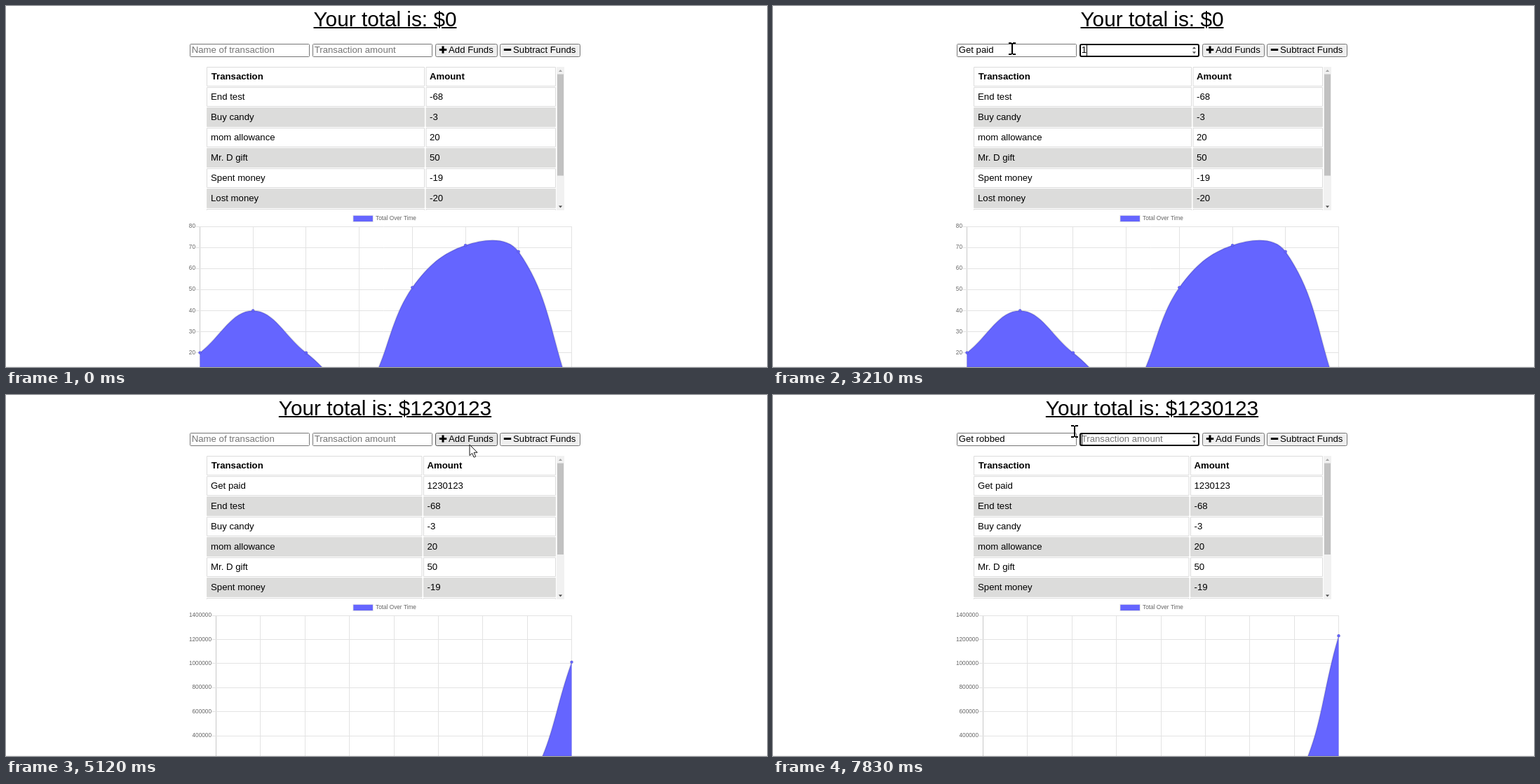
Animation of 1085 by 516 pixels, one loop 8 s. Source, as an HTML page with a canvas:

```html
<!DOCTYPE html>
<html lang="en">
<head>
<meta charset="utf-8">
<title>Budget tracker</title>
<style>
  html, body { margin: 0; width: 100%; height: 100%; overflow: hidden; background: #fff; }
  canvas { position: absolute; left: 0; top: 0; }
  #total {
    position: absolute; left: 0; top: 2px; width: 1081px; text-align: center;
    font: 29.75px/34px "Liberation Sans", Arial, sans-serif; color: #000;
    text-decoration: underline 2px;
  }
</style>
</head>
<body>
<div id="total"></div>
<canvas id="stage" width="1085" height="516"></canvas>
<script>
const LOOP = 8000, SUBMIT = 4840, CHART_START = 4770;
const ctx = document.getElementById('stage').getContext('2d');
const title = document.getElementById('total');
const FONT = '"Liberation Sans", Arial, sans-serif';
const BLUE = '#6565ff', SHADE = 'rgba(0,0,0,.1)', BORDER = '#767676';

const history = [
  ['Lost money', -20], ['Spent money', -19], ['Mr. D gift', 50],
  ['mom allowance', 20], ['Buy candy', -3], ['End test', -68], ['Get paid', 1230123]
];
const totals = [20, 40, 20, 1, 51, 71, 68, 0, 1230123];

// Key press times for each entry; the fields gain focus at the given times.
const firstName = { text: 'Get paid', keys: [1810, 1900, 1990, 2080, 2340, 2455, 2570, 2685] };
const firstAmount = { text: '1230123', keys: [3210, 3300, 3400, 3490, 3590, 3680, 4140] };
const secondName = { text: 'Get robbed', keys: [6760, 6870, 6980, 7090, 7200, 7320, 7430, 7500, 7610, 7720] };
const focusSpans = [
  [880, 2800, 'name'], [2800, 4740, 'amount'], [6100, 7830, 'name'], [7830, LOOP, 'amount']
];

// Pointer stops: time, x, y
const pointerPath = [
  [110, 1037, 496], [700, 341, 61], [4080, 341, 61], [4140, 350, 54], [4700, 671, 66],
  [4900, 671, 66], [5120, 661, 71], [5600, 677, 73], [5950, 677, 73], [6100, 415, 61], [6370, 430, 52]
];

const lerp = (a, b, u) => a + (b - a) * u;

function text(str, x, y, { size = 13.2, color = '#000', weight = '', align = 'left' } = {}) {
  ctx.font = `${weight} ${size}px ${FONT}`;
  ctx.fillStyle = color;
  ctx.textAlign = align;
  ctx.fillText(str, x, y);
}

function rect(x, y, w, h, color) {
  ctx.fillStyle = color;
  ctx.fillRect(x, y, w, h);
}

function line(x1, y1, x2, y2, color) {
  ctx.strokeStyle = color;
  ctx.lineWidth = 1;
  ctx.beginPath();
  ctx.moveTo(x1, y1);
  ctx.lineTo(x2, y2);
  ctx.stroke();
}

function frame(x, y, w, h, fill, stroke, width = 1, radius = 2) {
  ctx.beginPath();
  ctx.roundRect(x + width / 2, y + width / 2, w - width, h - width, radius);
  ctx.fillStyle = fill;
  ctx.fill();
  ctx.strokeStyle = stroke;
  ctx.lineWidth = width;
  ctx.stroke();
}

function polygon(points, color) {
  ctx.beginPath();
  points.forEach(([x, y]) => ctx.lineTo(x, y));
  ctx.closePath();
  ctx.fillStyle = color;
  ctx.fill();
}

// dir -1 points up, 1 points down
const triangle = (x, y, half, height, dir, color) =>
  polygon([[x - half, y - dir * height / 2], [x + half, y - dir * height / 2], [x, y + dir * height / 2]], color);

const typed = (entry, t) => entry.text.slice(0, entry.keys.filter(k => k <= t).length);

function pointerAt(t) {
  if (t < pointerPath[0][0]) return null;
  const next = pointerPath.findIndex(p => p[0] > t);
  if (next < 0) return pointerPath.at(-1).slice(1);
  const [t0, x0, y0] = pointerPath[next - 1], [t1, x1, y1] = pointerPath[next];
  const u = (t - t0) / (t1 - t0), e = u * u * (3 - 2 * u);
  return [lerp(x0, x1, e), lerp(y0, y1, e)];
}

function drawInput(x, value, placeholder, focus, t) {
  frame(x, 54, 171, 19, '#fff', focus ? '#000' : BORDER, focus ? 2 : 1, focus ? 2 : 1);
  text(value || placeholder, x + 2.7, 67, { color: value ? '#000' : '#757575' });
  if (!focus) return;
  const keys = [firstName, firstAmount, secondName].flatMap(e => e.keys);
  const lastInput = Math.max(focus[0], ...keys.filter(k => k <= t));
  if ((t - lastInput) % 1060 < 530) {
    const end = x + 2.7 + (value ? ctx.measureText(value).width : 0);
    rect(Math.round(end), 56, 1, 15, '#000');
  }
  if (focus[2] === 'amount') {
    triangle(600.5, 59.7, 2.6, 3, -1, '#505050');
    triangle(600.5, 66.7, 2.6, 3, 1, '#505050');
  }
}

function drawButton(x, w, label, plus, state) {
  const [fill, stroke] = { idle: ['#efefef', BORDER], hover: ['#e5e5e5', '#4f4f4f'], active: ['#f5f5f5', '#8d8d8d'] }[state];
  frame(x, 54, w, 19, fill, stroke);
  rect(x + 5.8, 61, 10.4, 3, '#000');
  if (plus) rect(x + 9.5, 57.4, 3, 10.2, '#000');
  text(label, x + 19, 67);
}

function drawTable(submitted) {
  const split = submitted ? 593.5 : 597;
  const entries = history.slice(0, submitted ? 7 : 6).reverse();
  const rows = [['Transaction', 'Amount'], ...entries, ['', '']];
  ctx.save();
  ctx.beginPath();
  ctx.rect(280, 80, 520, 212);
  ctx.clip();
  rows.slice(0, 8).forEach(([name, amount], i) => {
    const top = 87 + Math.round(28.95 * i), weight = i ? '' : 'bold';
    for (const [x, end] of [[286, split], [split + 1.5, 784]]) {
      const gray = i && i % 2 === 0;
      frame(x, top, end - x, 28, gray ? '#dcdcdb' : '#fff', gray ? '#dededd' : '#dcdcdc', 1, 0);
    }
    if (i < 7) {
      text(name, i ? 292 : 292.7, top + 18, { weight });
      text(amount, split + 7, top + 18, { weight });
    }
  });
  ctx.restore();
  rect(785, 87, 11, 205, '#f1f1f1');
  rect(786, 97.5, 9, submitted ? 130.5 : 145, '#c1c1c1');
  triangle(790.5, 92.5, 2.6, 2.8, -1, '#a3a3a3');
  triangle(790.5, 287, 2.6, 2.8, 1, '#505050');
}

// Each point with its incoming and outgoing handles, kept inside the plot.
function splineKnots(points, top, bottom) {
  const cap = y => Math.min(bottom, Math.max(top, y));
  return points.map((p, i) => {
    const a = points[i - 1] || p, b = points[i + 1] || p;
    const before = Math.hypot(p[0] - a[0], p[1] - a[1]), after = Math.hypot(b[0] - p[0], b[1] - p[1]);
    const k = 0.4 / (before + after), dx = b[0] - a[0], dy = b[1] - a[1];
    return [...p, p[0] - k * before * dx, cap(p[1] - k * before * dy), p[0] + k * after * dx, cap(p[1] + k * after * dy)];
  });
}

function traceSpline(knots) {
  ctx.beginPath();
  ctx.moveTo(knots[0][0], knots[0][1]);
  for (let i = 1; i < knots.length; i++) {
    const [x, y, inX, inY] = knots[i];
    ctx.bezierCurveTo(knots[i - 1][4], knots[i - 1][5], inX, inY, x, y);
  }
}

function drawChart(submitted, t) {
  const top = 315, bottom = 555.8, right = 806.5;
  const left = submitted ? 299.5 : 276.5;
  const max = submitted ? 1400000 : 80, tick = submitted ? 200000 : 10;
  const values = totals.slice(0, submitted ? 9 : 8);
  const step = (right - left) / (values.length - 1);
  const u = submitted ? Math.min(1, (t - CHART_START) / 1000) : 1;
  const grow = 1 - (1 - u) ** 4;
  const yOf = v => bottom - (bottom - top) * v / max;

  rect(494.3, 298.8, 29.6, 10.2, SHADE);
  rect(495.3, 299.8, 27.6, 8.2, BLUE);
  text('Total Over Time', 527, 306, { size: 8.25, color: '#666' });

  values.forEach((_, i) => {
    const x = Math.round(left + i * step - 0.5) + 0.5;
    line(x, top, x, 516, i ? '#e3e3e3' : '#c8c8c8');
  });
  for (let v = max; yOf(v) < 516; v -= tick) {
    const y = Math.floor(yOf(v)) + 0.5;
    line(left - 6, y, right, y, '#e3e3e3');
    text(v, left - 6.5, Math.round(yOf(v) + 2.2), { size: 8.25, color: '#666', align: 'right' });
  }

  const knotsFor = scale => splineKnots(values.map((v, i) => [left + i * step, yOf(v * scale)]), top, bottom);
  const flat = knotsFor(0);
  const knots = knotsFor(1).map((knot, i) => knot.map((n, j) => lerp(flat[i][j], n, grow)));
  traceSpline(knots);
  ctx.lineTo(right, bottom);
  ctx.lineTo(left, bottom);
  ctx.fillStyle = BLUE;
  ctx.fill();
  traceSpline(knots);
  ctx.strokeStyle = SHADE;
  ctx.lineWidth = 2;
  ctx.stroke();
  for (const [x, y] of knots) {
    ctx.beginPath();
    ctx.arc(x, y, 2.1, 0, 7);
    ctx.fillStyle = BLUE;
    ctx.fill();
    ctx.lineWidth = 1;
    ctx.stroke();
  }
}

function drawPointer([x, y]) {
  const overInput = y > 51 && y < 74 && ((x > 262 && x < 434) || (x > 437 && x < 608));
  if (overInput) {
    x = Math.round(x);
    y = Math.round(y);
    rect(x - 1, y - 8, 2, 16, '#000');
    for (const dy of [-9, 7]) {
      rect(x - 5, y + dy, 4, 2, '#000');
      rect(x + 1, y + dy, 4, 2, '#000');
    }
    return;
  }
  const outline = [[0, 0], [0, 15.5], [3.6, 12.2], [6.2, 18], [8.7, 16.9], [6.2, 11.2], [11, 11.2]];
  polygon(outline.map(([dx, dy]) => [x + dx, y + dy]), '#fff');
  ctx.strokeStyle = '#111';
  ctx.lineWidth = 1;
  ctx.stroke();
}

function draw(now) {
  const t = now % LOOP;
  const submitted = t >= SUBMIT;
  const pointer = pointerAt(t);
  const focus = focusSpans.find(([from, to]) => t >= from && t < to);
  const focusOn = name => focus && focus[2] === name ? focus : null;
  const over = (x, w) => pointer && pointer[0] > x && pointer[0] < x + w && pointer[1] > 53 && pointer[1] < 73;
  const state = (x, w) => over(x, w) ? 'hover' : 'idle';

  title.textContent = 'Your total is: $' + (submitted ? 1230123 : 0);
  ctx.clearRect(0, 0, 1085, 516);
  drawInput(262, typed(submitted ? secondName : firstName, t), 'Name of transaction', focusOn('name'), t);
  drawInput(437, submitted ? '' : typed(firstAmount, t), 'Transaction amount', focusOn('amount'), t);
  drawButton(612, 89, 'Add Funds', true, t > 4720 && !submitted ? 'active' : state(612, 89));
  drawButton(704, 115, 'Subtract Funds', false, state(704, 115));
  drawTable(submitted);
  drawChart(submitted, t);
  rect(0, 515, 1085, 1, 'rgba(0,0,0,.05)');
  if (pointer) drawPointer(pointer);
  requestAnimationFrame(() => draw(performance.now() - start));
}

const start = performance.now();
draw(0);
</script>
</body>
</html>
```
